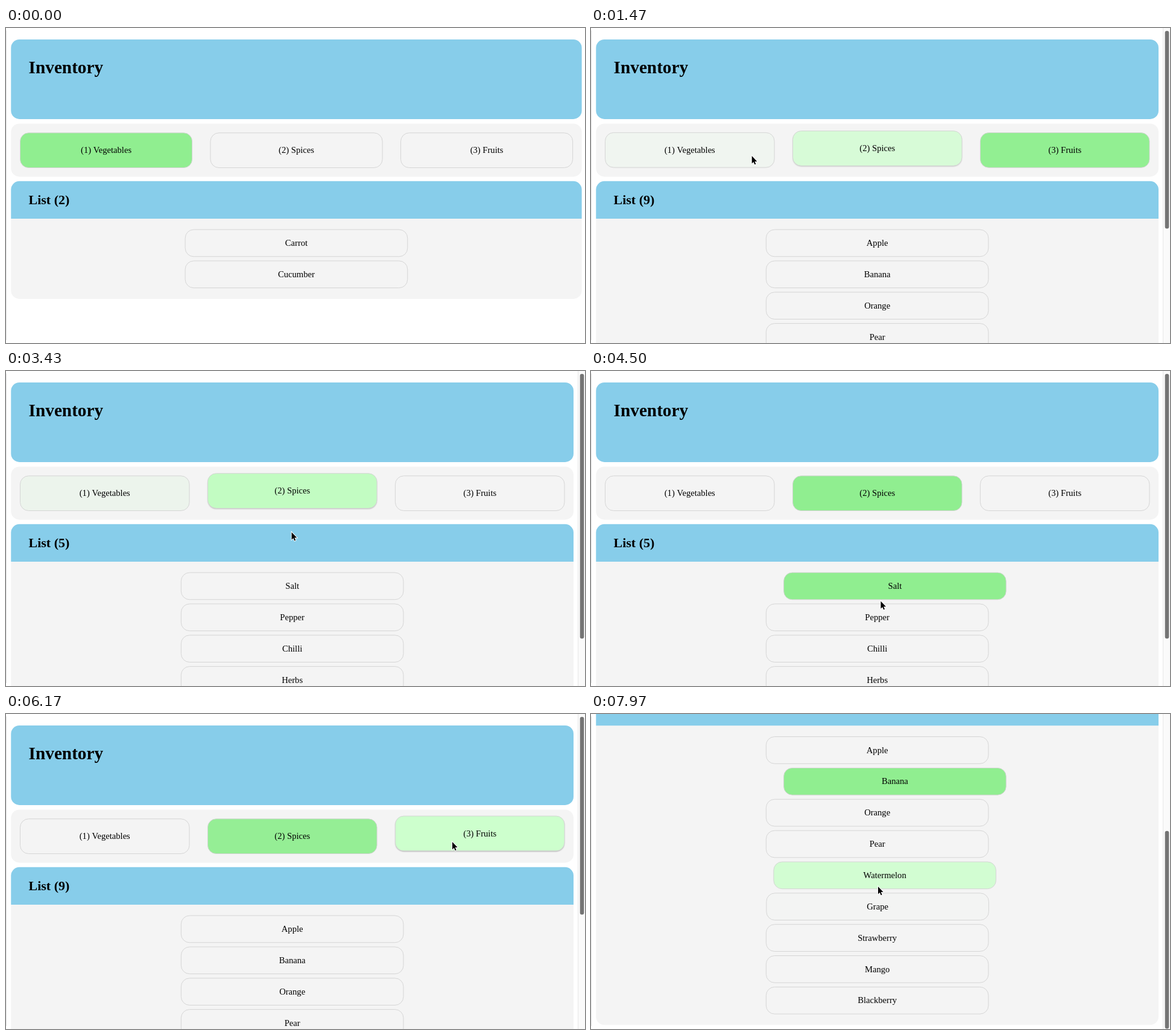
An HTML page with a canvas for the animation above (8 s loop, 960 by 522 pixels).

```html
<!DOCTYPE html>
<html lang="en">
<head>
<meta charset="utf-8">
<title>Inventory</title>
<style>
html, body { margin: 0; width: 100%; height: 100%; overflow: hidden; background: #fff; }
canvas { display: block; }
</style>
</head>
<body>
<canvas id="stage" width="960" height="522"></canvas>
<script>
const ctx = document.getElementById('stage').getContext('2d');
const LOOP = 8000, FADE = 300, STEP = 2;
const EM = 14.63, LEFT = 8.3, PITCH = 51.85, RADIUS = 14;
const SKY = '#87cdea', PANEL = '#f4f4f4', LINE = '#d3d3d3';

// Red, green, blue, lift, shift for each look.
const IDLE = [244, 244, 244, 0, 0], HOVER = [204, 255, 204, 1, 1], SELECTED = [144, 238, 144, 0, 2];

const groups = [
  { tab: '(1) Vegetables', items: ['Carrot', 'Cucumber'] },
  { tab: '(2) Spices', items: ['Salt', 'Pepper', 'Chilli', 'Herbs', 'Garlic'] },
  { tab: '(3) Fruits', items: ['Apple', 'Banana', 'Orange', 'Pear', 'Watermelon',
    'Grape', 'Strawberry', 'Mango', 'Blackberry'] }
];

// The pointer's stops: x, y, arrival, departure. It clicks halfway through each stay.
const stops = [
  [600, -20, 90, 90],
  [550, 211, 608, 660],
  [705, 213, 1040, 1160],
  [225, 212, 1540, 1660],
  [455, 362, 1960, 2080],
  [470.5, 415, 2270, 2790],
  [474, 212, 3127, 3337],
  [473, 359, 3563, 4400],
  [490, 410, 4620, 4880],
  [516, 477, 5082, 5290],
  [521, 506, 5470, 5470],
  [740, 212, 6010, 6290],
  [480, 415, 6800, 7200],
  [476, 303, 7670, 7670],
  [476, 286, 7870, 7870]
];

const clamp = v => Math.min(1, Math.max(0, v));
const smooth = v => (v = clamp(v)) * v * (3 - 2 * v);
const mix = (a, b, k) => a + (b - a) * k;
const scrollAt = t => 296.5 * smooth((t - 7280) / 400);

// cubic-bezier(.25, .1, .25, 1)
function ease(v) {
  const curve = (a, b, u) => 3 * a * u * (1 - u) ** 2 + 3 * b * u * u * (1 - u) + u ** 3;
  let lo = 0, hi = 1;
  for (let i = 0; i < 20; i++) {
    const mid = (lo + hi) / 2;
    if (curve(.25, .25, mid) < v) lo = mid; else hi = mid;
  }
  return curve(.1, 1, lo);
}

function pointerAt(t) {
  let [x, y, , left] = stops[0];
  for (const [nx, ny, arrive, leave] of stops) {
    if (t < left) break;
    const k = smooth((t - left) / (arrive - left || 1));
    x = mix(x, nx, k);
    y = mix(y, ny, k);
    left = leave;
  }
  return { x, y, beam: false };
}

// Buttons of one view in page coordinates, at rest.
function layout(view) {
  const { items } = groups[view], long = items.length > 2;
  const width = (long ? 941 : 954.6) - LEFT, tabWidth = (width - 88) / 3;
  const tabs = groups.map((g, i) => (
    { name: g.tab, tab: i, x: 23 + i * (tabWidth + 29.4), y: 173.3, w: tabWidth, h: 58.7 }));
  const rows = items.map((name, i) => (
    { name, x: LEFT + (width - 369.6) / 2, y: 333.6 + i * PITCH, w: 369.6, h: 45.7 }));
  return { count: items.length, long, width, buttons: [...tabs, ...rows] };
}
const layouts = groups.map((g, i) => layout(i));

// Play the pointer once and note when each button changes its look and each view opens.
const tracks = {}, views = [];

function setLook(name, look, t) {
  const track = tracks[name] ||= [{ look: IDLE, t: -LOOP }];
  if (track.at(-1).look !== look) track.push({ look, t });
}

function rehearse() {
  const clicks = stops.filter(s => s[3] > s[2]).map(s => (s[2] + s[3]) / 2);
  let view = 0, picked = null;
  views.push({ view, t: 0 });
  setLook(groups[0].tab, SELECTED, -FADE);
  for (let t = 0; t < LOOP; t += STEP) {
    const p = pointerAt(t), py = p.y + scrollAt(t);
    const inside = b => p.x > b.x && p.x < b.x + b.w && py > b.y && py < b.y + b.h;
    const hit = layouts[view].buttons.find(inside);
    if (hit && t >= clicks[0]) {
      clicks.shift();
      if (hit.tab === undefined) picked = hit.name;
      else views.push({ view: view = hit.tab, t });
    }
    for (const b of layouts[view].buttons) {
      const isTab = b.tab !== undefined, hovered = b.name === hit?.name;
      const chosen = isTab ? b.tab === view : b.name === picked;
      const look = hovered && (isTab || !chosen) ? HOVER : chosen ? SELECTED : IDLE;
      setLook(b.name, look, t);
    }
  }
}

// Interrupted transitions continue from where they were.
function lookAt(name, t) {
  let from = IDLE, to = IDLE, start = -LOOP;
  const at = time => {
    const k = ease(clamp((time - start) / FADE));
    return from.map((a, i) => mix(a, to[i], k));
  };
  for (const change of tracks[name]) {
    if (change.t > t) break;
    from = at(change.t);
    to = change.look;
    start = change.t;
  }
  return at(t);
}

function box(x, y, w, h, radii, fill, stroke) {
  ctx.beginPath();
  ctx.roundRect(x, y, w, h, radii);
  ctx.fillStyle = fill;
  ctx.fill();
  if (!stroke) return;
  ctx.shadowColor = 'transparent';
  ctx.strokeStyle = stroke;
  ctx.lineWidth = .92;
  ctx.stroke();
}

function text(str, x, y, size, weight, align) {
  ctx.font = `${weight} ${size}px "Liberation Serif", "Times New Roman", serif`;
  ctx.textAlign = align;
  ctx.fillStyle = '#000';
  ctx.fillText(str, x, y);
}

function drawButton(b, t, pointer, scroll) {
  const [red, green, blue, lift, shift] = lookAt(b.name, t);
  const isTab = b.tab !== undefined;
  const x = b.x + (isTab ? 0 : shift * EM), y = b.y - (isTab ? lift * 4.8 : 0);
  ctx.shadowColor = `rgba(0,0,0,${isTab ? .25 * lift : 0})`;
  ctx.shadowOffsetY = 1.4;
  ctx.shadowBlur = 1.8;
  box(x + .5, y + .5, b.w - 1, b.h - 1, RADIUS, `rgb(${red},${green},${blue})`, LINE);
  const cx = x + b.w / 2, cy = y + b.h / 2;
  text(b.name, cx, cy + 4.6, EM, 'normal', 'center');
  const reach = ctx.measureText(b.name).width / 2;
  if (Math.abs(pointer.x - cx) < reach && Math.abs(pointer.y + scroll - cy) < 9) pointer.beam = true;
}

function drawPointer({ x, y, beam }) {
  const shape = new Path2D(beam
    ? 'M-3 -6.5Q0 -6.5 0 -4.5Q0 -6.5 3 -6.5M0 -4.5V4.5M-3 6.5Q0 6.5 0 4.5Q0 6.5 3 6.5M-1.5 2.5H1.5'
    : 'M0 0V12.4L2.8 9.8L4.7 14.2L6.6 13.4L4.7 9.1H8.6Z');
  ctx.save();
  ctx.translate(x, y);
  ctx.strokeStyle = '#fff';
  ctx.lineWidth = beam ? 3 : 1.8;
  ctx.stroke(shape);
  ctx.strokeStyle = ctx.fillStyle = '#000';
  ctx.lineWidth = 1.2;
  if (beam) ctx.stroke(shape); else ctx.fill(shape);
  ctx.restore();
}

function drawScrollbar(ratio, scroll) {
  ctx.fillStyle = '#fafafa';
  ctx.fillRect(948, 0, 12, 522);
  ctx.fillStyle = '#e8e8e8';
  ctx.fillRect(948, 0, 1, 522);
  box(951.7, 4.8 + scroll * ratio, 6.6, 514 * ratio, 3.3, '#747474');
}

function draw(t) {
  const { view } = views.findLast(v => v.t <= t);
  const { count, long, width, buttons } = layouts[view];
  const bodyHeight = count * PITCH + 29.2;
  const scroll = scrollAt(t), pointer = pointerAt(t);

  ctx.fillStyle = '#fff';
  ctx.fillRect(0, 0, 960, 522);
  ctx.save();
  ctx.translate(0, -scroll);
  box(LEFT, 18.9, width, 132, RADIUS, SKY);
  text('Inventory', 37.6, 74.8, 29.26, 'bold', 'left');
  box(LEFT, 158.4, width, 88, RADIUS, PANEL);
  box(LEFT, 253.8, width, 62.2, [RADIUS, RADIUS, 0, 0], SKY);
  text(`List (${count})`, 37.6, 291.8, 21.94, 'bold', 'left');
  box(LEFT, 316, width, bodyHeight, [0, 0, RADIUS, RADIUS], PANEL);
  for (const b of buttons) drawButton(b, t, pointer, scroll);
  ctx.restore();

  if (long) drawScrollbar(522 / (323 + bodyHeight), scroll);
  ctx.fillStyle = '#e4e4e4';
  ctx.fillRect(0, 4, 1, 513);
  drawPointer(pointer);
}

function frame() {
  draw(performance.now() % LOOP);
  requestAnimationFrame(frame);
}
rehearse();
frame();
</script>
</body>
</html>
```
